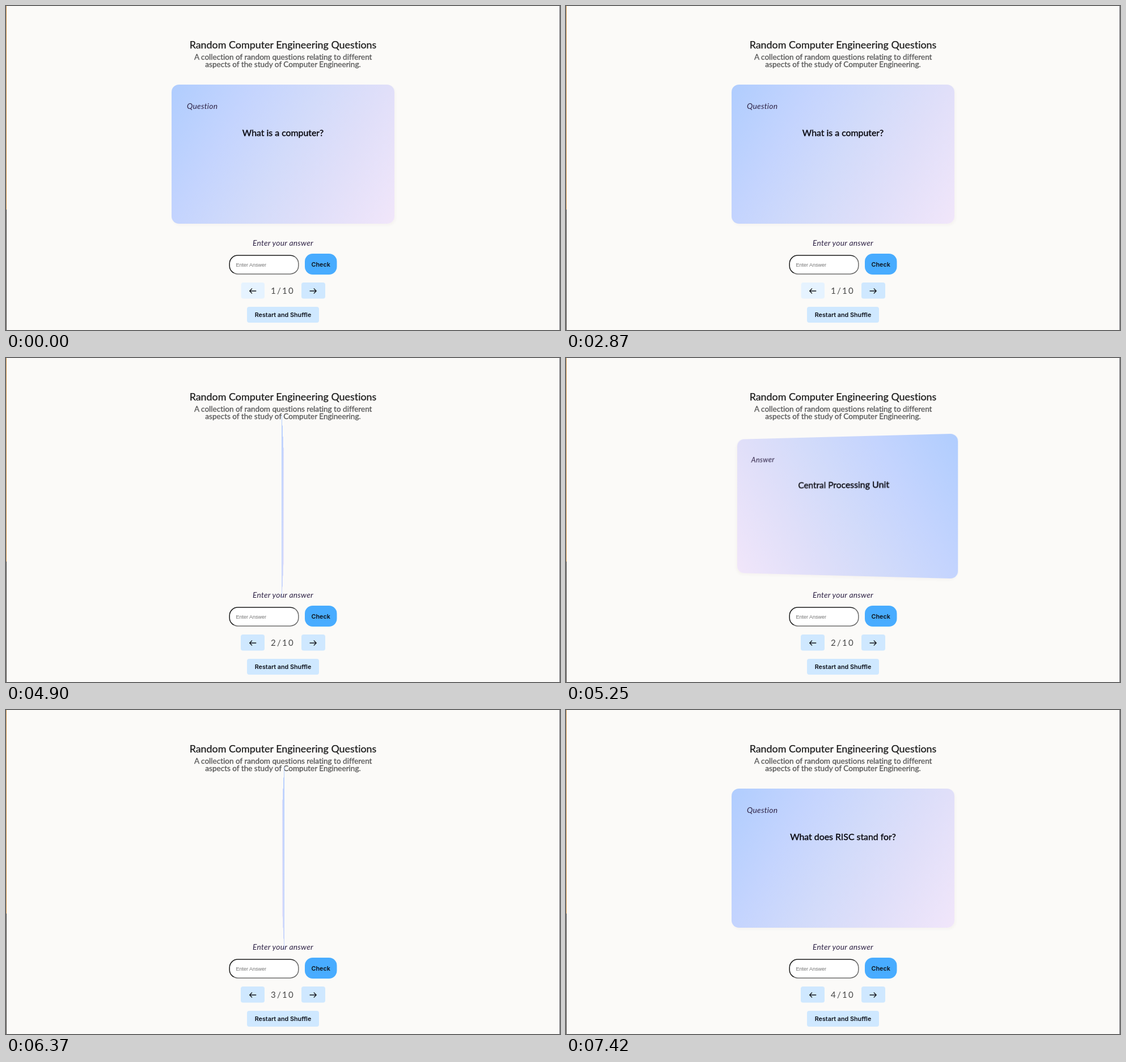
Animation, 977 px wide and 573 px high, one loop 8 s. Source, as an HTML page:

```html
<!DOCTYPE html>
<html lang="en">
<head>
<meta charset="utf-8">
<title>Flashcards</title>
<style>
  html, body { margin: 0; width: 100%; height: 100%; overflow: hidden; background: #fbfaf8; }
  #stage { position: relative; width: 977px; height: 573px; overflow: hidden; }
  svg { position: absolute; left: 0; top: 0; overflow: visible; }
  text { font-family: Lato, "Noto Sans", sans-serif; font-variant-ligatures: none; }
  .mid { text-anchor: middle; }
  .title { font-size: 17.9px; fill: #1b1b1b; stroke: #1b1b1b; stroke-width: .25px; }
  .sub { font-size: 13.55px; fill: #575757; stroke: #575757; stroke-width: .3px; }
  .label { font-size: 13.8px; font-style: italic; letter-spacing: .25px; fill: #2f2346; }
  .ask { font-size: 15.85px; fill: #0a0a10; stroke: #0a0a10; stroke-width: .42px; }
  .count { font-size: 15px; letter-spacing: 2.3px; fill: #464646; }
  .button { font: 600 10.75px Inter, sans-serif; fill: #0c1018; }
  .hint { font: 9px "Liberation Sans", Arial, sans-serif; fill: #757575; }
  .arrow { fill: none; stroke: #15181c; stroke-width: 1.3; stroke-linecap: round; stroke-linejoin: round; }
  #card {
    position: absolute; left: 292px; top: 139px; width: 393px; height: 246px; border-radius: 13px;
    background: linear-gradient(120deg, #b0cdfe, #c4d4fe 27%, #d2dbfa 50%, #e0dff9 72%, #f1e6fa);
    box-shadow: 2px 3px 5px rgba(50, 40, 20, .03);
  }
  #back { transform: scaleX(-1); }
</style>
</head>
<body>
<div id="stage">
  <svg width="977" height="573">
    <defs>
      <linearGradient id="inset" x1="0" y1="0" x2="1" y2="1">
        <stop offset=".5" stop-color="#1a1a1a"/>
        <stop offset=".5" stop-color="#6c6c6c"/>
      </linearGradient>
    </defs>
    <rect width="1" height="360" fill="#c68b42"/>
    <rect y="360" width="1" height="213" fill="#45403d"/>
    <rect x="976" width="1" height="573" fill="#707074"/>

    <text class="title mid" x="488.5" y="75.3">Random Computer Engineering Questions</text>
    <text class="sub mid" x="488.7" y="94.6">A collection of random questions relating to different</text>
    <text class="sub mid" x="488.5" y="107.6">aspects of the study of Computer Engineering.</text>

    <text class="label mid" x="488.5" y="424.4">Enter your answer</text>
    <rect x="394.2" y="441.1" width="121.6" height="32.8" rx="14.5" fill="#fff" stroke="url(#inset)" stroke-width="1.5"/>
    <text class="hint" x="405.5" y="460.6">Enter Answer</text>
    <rect x="527" y="438" width="56.5" height="37" rx="14" fill="#48acff"/>
    <text class="button mid" x="555.2" y="460.7">Check</text>

    <rect id="prev" y="489" height="28.5" rx="4"/>
    <rect x="521" y="489" width="42" height="28.5" rx="4" fill="#cfe8ff"/>
    <path class="arrow" d="M440.8 504H429.6m4-4-4 4 4 4M536 504h11.2m-4-4 4 4-4 4"/>
    <text id="count" class="count" x="467" y="508.6"></text>

    <rect x="425" y="532" width="127" height="28" rx="4" fill="#cfe8ff"/>
    <text class="button mid" x="488.5" y="550">Restart and Shuffle</text>
  </svg>
  <div id="card">
    <svg id="front" width="393" height="246">
      <text class="label" x="27" y="43">Question</text>
      <text id="question" class="ask mid" x="196.5" y="90.7"></text>
    </svg>
    <svg id="back" width="393" height="246">
      <text class="label" x="27" y="43">Answer</text>
      <text class="ask mid" x="196.5" y="90.7">Central Processing Unit</text>
    </svg>
  </div>
</div>
<script>
const LOOP = 8000, STEP = 70, FLIP = 800;
const questions = [
  "What is a computer?",
  "What does CPU stand for?",
  "What is the purpose of an ALU?",
  "What does RISC stand for?"
];
// [time, question index]
const pages = [[0, 0], [1960, 1], [2870, 0], [3780, 1], [6090, 2], [7420, 3]];
const el = id => document.getElementById(id);
const [card, front, back, question, count, prev] =
  ["card", "front", "back", "question", "count", "prev"].map(el);

// cubic-bezier(.25, .1, .25, 1)
function ease(x) {
  if (x <= 0) return 0;
  if (x >= 1) return 1;
  let lo = 0, hi = 1;
  for (let i = 0; i < 30; i++) {
    const u = (lo + hi) / 2;
    if (.75 * u * (1 - u) + u ** 3 < x) lo = u; else hi = u;
  }
  return .3 * lo * (1 - lo) ** 2 + 3 * lo * lo * (1 - lo) + lo ** 3;
}

function angleAt(t) {
  return 180 * (ease((t - 4666.5) / FLIP) - ease((t - 6136.5) / FLIP));
}

function show(node, on) {
  node.style.display = on ? "" : "none";
}

function draw(time) {
  const t = Math.floor(time / STEP) * STEP;
  const page = pages.filter(p => p[0] <= t).pop()[1];
  const flipped = t >= 4690 && t < 6090;
  const angle = angleAt(t);

  question.textContent = questions[page];
  count.textContent = `${page + 1}/10`;
  prev.setAttribute("x", page ? 414 : 414.6);
  prev.setAttribute("width", page ? 42 : 41.4);
  prev.setAttribute("fill", page ? "#cfe8ff" : "#e6f3ff");

  card.style.transform = angle ? `perspective(700px) rotateY(${angle}deg)` : "none";
  show(front, !flipped && angle < 90);
  show(back, flipped && angle > 90);
}

const start = performance.now();
function tick() {
  draw((performance.now() - start) % LOOP);
  requestAnimationFrame(tick);
}
tick();
</script>
</body>
</html>
```
